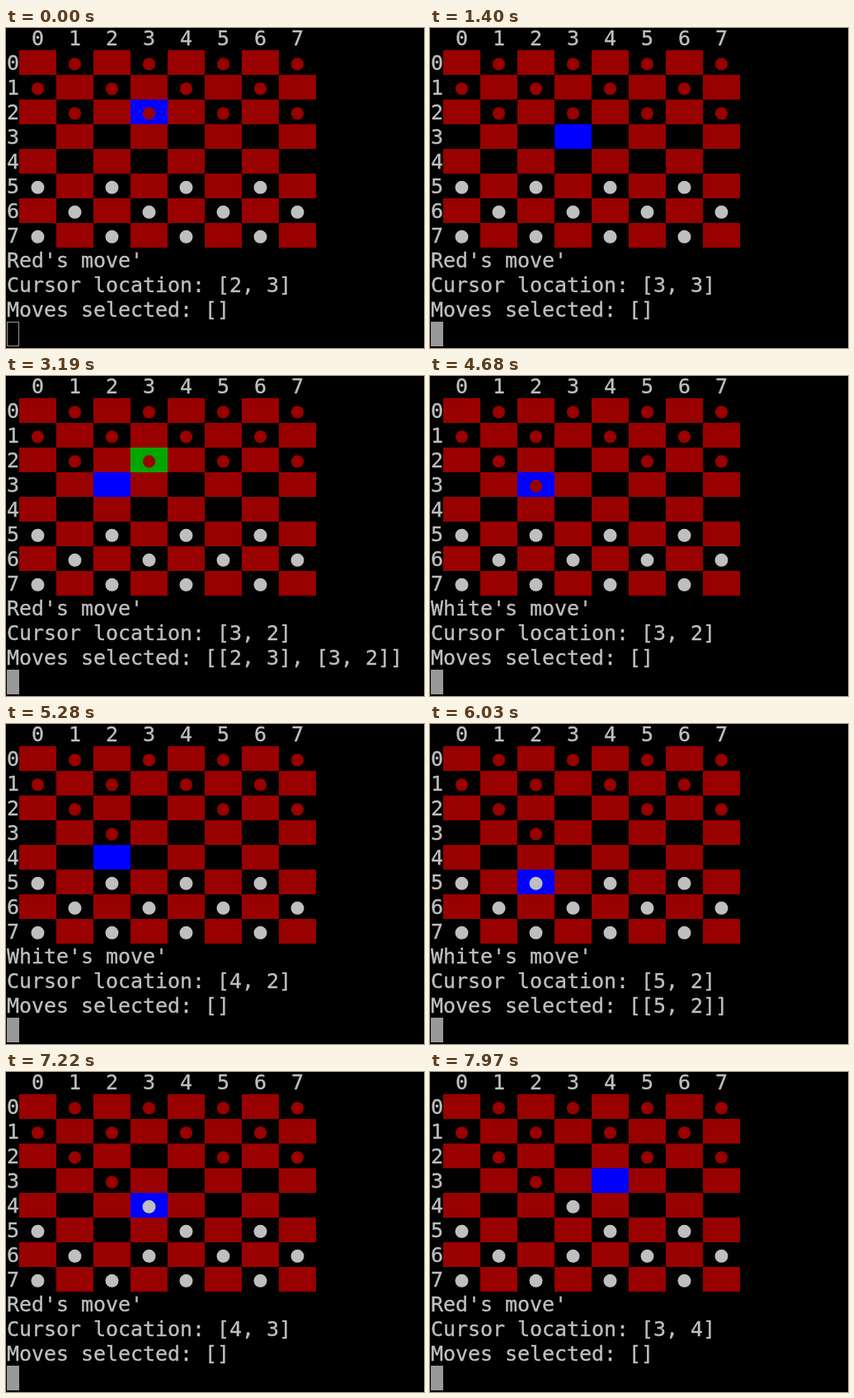
Animation, 507 px wide and 389 px high, one loop 8000 ms. Source, as an HTML page:

```html
<!DOCTYPE html>
<html lang="en">
<head>
<meta charset="utf-8">
<title>Terminal checkers</title>
<style>
  html, body { margin: 0; width: 100%; height: 100%; overflow: hidden; background: #000; }
  svg { display: block; }
  text {
    font: 25px "DejaVu Sans Mono", monospace;
    letter-spacing: -.05px;
    white-space: pre;
    fill: #bfbfbf;
    stroke: #bfbfbf;
    stroke-width: .35px;
  }
</style>
</head>
<body>
<svg id="stage" width="507" height="389" viewBox="0 0 507 389"></svg>
<script>
const LOOP = 8000, CELL_W = 45, ROW_H = 30, LEFT = 16, TOP = 27;
const RED = '#990000', WHITE = '#bfbfbf', BLUE = '#0000ff', GREEN = '#00a600', BLOCK = '#999999';

// Start time, cursor, selected squares, finished moves
const steps = [
  [0,    '23', [], 0],
  [1400, '33', [], 0],
  [1850, '23', [], 0],
  [2150, '23', ['23'], 0],
  [2290, '33', ['23'], 0],
  [2440, '32', ['23'], 0],
  [3190, '32', ['23', '32'], 0],
  [4680, '32', [], 1],
  [5280, '42', [], 1],
  [5430, '52', [], 1],
  [6030, '52', ['52'], 1],
  [6170, '42', ['52'], 1],
  [6320, '43', ['52'], 1],
  [6770, '43', ['52', '43'], 1],
  [7220, '43', [], 2],
  [7820, '33', [], 2],
  [7970, '34', [], 2]
];
const played = [['23', '32'], ['52', '43']];

const stage = document.getElementById('stage');

function add(tag, attrs, text = '') {
  const el = document.createElementNS('http://www.w3.org/2000/svg', tag);
  for (const key in attrs) el.setAttribute(key, attrs[key]);
  el.textContent = text;
  return stage.appendChild(el);
}
const rect = (x, y, width, height, fill) => add('rect', { x, y, width, height, fill });
const line = (row, text) => add('text', { x: 1, y: 21 + row * ROW_H }, text);
const pair = sq => `[${sq[0]}, ${sq[1]}]`;

rect(0, 0, 507, 389, '#000');
line(0, '  0  1  2  3  4  5  6  7');

const squares = {}, pieces = {};
for (let r = 0; r < 8; r++) {
  line(r + 1, String(r));
  for (let c = 0; c < 8; c++) {
    const x = LEFT + c * CELL_W, y = TOP + r * ROW_H;
    squares[`${r}${c}`] = rect(x, y, CELL_W, ROW_H, '#000');
    pieces[`${r}${c}`] = add('circle', { cx: x + 22.5, cy: y + 16.8 });
  }
}
const turn = line(9), place = line(10), chosen = line(11);
rect(1, 357, 15, 30, BLOCK);
const hollow = rect(2, 358, 13, 28, '#000');

function layout(done) {
  const board = {};
  for (const sq in squares) {
    const r = +sq[0];
    if ((r + +sq[1]) % 2 && (r < 3 || r > 4)) board[sq] = r < 3 ? RED : WHITE;
  }
  for (const [from, to] of played.slice(0, done)) {
    board[to] = board[from];
    delete board[from];
  }
  return board;
}

function show([, cursor, picks, done]) {
  const board = layout(done);
  for (const sq in squares) {
    const base = (+sq[0] + +sq[1]) % 2 ? '#000' : RED;
    const fill = sq === cursor ? BLUE : picks.includes(sq) ? GREEN : base;
    squares[sq].setAttribute('fill', fill);
    pieces[sq].setAttribute('fill', board[sq] || 'none');
    pieces[sq].setAttribute('r', board[sq] === WHITE ? 8 : 7.6);
  }
  turn.textContent = `${done % 2 ? 'White' : 'Red'}'s move'`;
  place.textContent = `Cursor location: ${pair(cursor)}`;
  chosen.textContent = `Moves selected: [${picks.map(pair).join(', ')}]`;
}

let current;
function tick() {
  const t = performance.now() % LOOP;
  const step = steps.filter(s => s[0] <= t).pop();
  if (step !== current) show(current = step);
  hollow.setAttribute('visibility', t < 500 ? 'visible' : 'hidden');
  requestAnimationFrame(tick);
}
tick();
</script>
</body>
</html>
```
